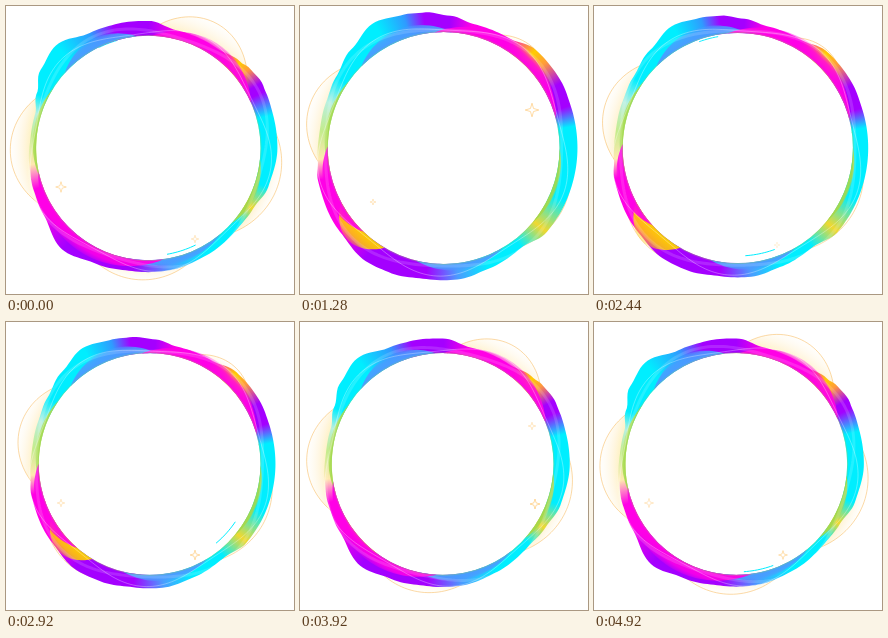
These frames come from a looping animation (288 by 288 pixels, 5120 ms). An HTML page with a canvas:

```html
<!DOCTYPE html>
<html lang="en">
<head>
<meta charset="utf-8">
<title>Iridescent ring</title>
<style>
html, body { margin: 0; width: 100%; height: 100%; overflow: hidden; background: #fff; }
canvas { display: block; width: 288px; height: 288px; }
</style>
</head>
<body>
<canvas id="stage" width="288" height="288"></canvas>
<script>
const ctx = document.getElementById('stage').getContext('2d');
const R = 113, CX = 142.3, CY = 142, LOOP = 5120, STEPS = 60;
const TAU = Math.PI * 2, RAD = Math.PI / 180;
const CYAN = '#00eeff', BLUE = '#4a9cff', PURPLE = '#a400ff', PINK = '#ff00e6', GOLD = '#ffcc00';

// Outer band: colour, then angle and thickness in the first pose and in the second
const BAND = [
  [CYAN, 0, 17, 0, 15], [CYAN, 18, 14, 24, 15], ['#f0d830', 30, 9, 40, 15],
  [CYAN, 40, 8, 53, 9], [CYAN, 62, 10, 70, 11], [BLUE, 80, 12, 84, 14],
  [PURPLE, 97, 12, 98, 14], [PURPLE, 115, 15, 113, 17], [PURPLE, 130, 21, 125, 18],
  [PINK, 148, 12, 140, 15], [PINK, 160, 10, 166, 12], ['#ffe9b0', 172, 8, 175, 9],
  ['#c4ec8c', 186, 6, 188, 8], ['#b8f0e0', 197, 6, 202, 9], [CYAN, 206, 12, 214, 11],
  [CYAN, 216, 21, 228, 16], [CYAN, 228, 26, 242, 23], ['#2f9bff', 243, 17, 254, 20],
  [PURPLE, 254, 16, 262, 18], [PURPLE, 270, 15, 273, 14], [PINK, 283, 9, 283, 10],
  [PINK, 305, 9, 300, 10], [GOLD, 317, 14, 313, 16], ['#ff9a3c', 322, 17, 320, 16],
  [PURPLE, 330, 19, 331, 16], [PURPLE, 334, 18, 342, 15], [CYAN, 345, 17, 351, 15]
];

// Crescents along the inner edge: colour, then start, end and height in both poses
const CRESCENTS = [
  [BLUE, 222, 264, 10, 225, 275, 11],
  [BLUE, 50, 102, 7, 60, 104, 7],
  ['#a8d848', 6, 42, 5, 0, 40, 4],
  ['#a8dc50', 164, 212, 4, 168, 215, 4],
  [GOLD, 128, 152, 0, 120, 152, 18],
  [PINK, 272, 336, 13, 265, 346, 12],
  [PINK, 82, 168, 12, 138, 182, 10]
];

// Pale outlined lobes: start, end and height in both poses
const LOBES = [
  [268, 330, 30, 290, 335, 17],
  [335, 412, 23, 352, 425, 17],
  [60, 130, 20, 100, 165, 18],
  [145, 212, 26, 168, 230, 24]
];

// Sparkles: x, y, size, step of full brightness
const SPARKS = [
  [55, 181, 6, 2], [55, 181, 5, 38], [189, 233, 5, 57], [189, 233, 5, 34],
  [105, 52, 5, 7], [38, 156, 5, 8], [232, 104, 7, 14], [73, 196, 4, 18],
  [79, 216, 5, 24], [183, 239, 5, 25], [235, 182, 5, 47], [232, 104, 5, 50]
];

const POSE = [[0, 0], [7, .65], [15, .92], [23, 1], [30, 1], [35, .87], [47, .2], [59, 0], [60, 0]];
const SWELL = [[0, 1], [7, 1.1], [15, 1.15], [23, 1], [60, 1]];

const mix = (a, b, u) => a + (b - a) * u;
const blend = (row, at, p) => mix(row[at], row[at + (row.length === 5 ? 2 : 3)], p);

function track(keys, x) {
  const n = keys.findIndex(k => k[0] > x);
  const [a, b] = [keys[n - 1], keys[n]];
  return mix(a[1], b[1], (x - a[0]) / (b[0] - a[0]));
}

function polar(r, from, to) {
  const n = Math.max(2, Math.ceil(Math.abs(to - from) / 1.5));
  for (let j = 0; j <= n; j++) {
    const a = mix(from, to, j / n), d = r(a, j / n);
    ctx.lineTo(d * Math.cos(a * RAD), d * Math.sin(a * RAD));
  }
}

function line(r, from, to, color, width) {
  ctx.beginPath();
  polar(r, from, to);
  ctx.strokeStyle = color;
  ctx.lineWidth = width;
  ctx.stroke();
}

function arch(from, to, height, fill) {
  const r = (a, u) => R + height * Math.max(0, Math.sin(Math.PI * u)) ** .9;
  ctx.beginPath();
  polar(r, from, to);
  polar(() => R, to, from);
  ctx.closePath();
  ctx.fillStyle = fill;
  ctx.fill();
  return r;
}

function drawLobes(p) {
  for (const row of LOBES) {
    const [from, to, h] = [0, 1, 2].map(n => blend(row, n, p));
    const g = ctx.createRadialGradient(0, 0, R, 0, 0, R + h);
    g.addColorStop(0, 'rgba(250,220,80,.5)');
    g.addColorStop(.5, 'rgba(255,230,170,.35)');
    g.addColorStop(1, 'rgba(255,250,240,.15)');
    line(arch(from, to, h, g), from, to, '#f9bf68', .6);
  }
}

function drawBand(p, swell) {
  const pts = BAND.map(row => [blend(row, 1, p), blend(row, 2, p) * swell]);
  pts.push([360, pts[0][1]]);
  const edge = a => {
    let n = 1;
    while (n < pts.length - 1 && pts[n][0] < a) n++;
    const [a0, h0] = pts[n - 1], [a1, h1] = pts[n];
    return R + mix(h0, h1, (1 - Math.cos(Math.PI * (a - a0) / (a1 - a0))) / 2);
  };
  const g = ctx.createConicGradient(0, 0, 0);
  BAND.forEach((row, n) => g.addColorStop(pts[n][0] / 360, row[0]));
  g.addColorStop(1, CYAN);
  ctx.beginPath();
  polar(edge, 0, 360);
  ctx.closePath();
  ctx.moveTo(R, 0);
  ctx.arc(0, 0, R, 0, TAU);
  ctx.fillStyle = g;
  ctx.fill('evenodd');
}

function drawCrescents(p) {
  for (const row of CRESCENTS) {
    const [from, to, h] = [1, 2, 3].map(n => blend(row, n, p));
    if (h < .3) continue;
    const g = ctx.createRadialGradient(0, 0, R, 0, 0, R + h);
    g.addColorStop(0, row[0]);
    g.addColorStop(.6, row[0] + 'd8');
    g.addColorStop(1, row[0] + '40');
    arch(from, to, h, g);
  }
}

function drawStrands(p) {
  const wave = (n, shift) => a => R + 7 + 5 * Math.sin((n * a + shift) * RAD);
  line(wave(5, 40 - 60 * p), 0, 360, 'rgba(255,255,255,.4)', .8);
  line(wave(4, 200 + 70 * p), 0, 360, 'rgba(255,255,255,.14)', 3);
  line(() => R + .4, 0, 360, 'rgba(150,210,90,.4)', .8);
}

// Two opposite streaks circle once per loop and show only on part of the way
function drawStreaks(i) {
  const a = (((71 - 6 * i) % 180) + 180) % 180;
  if (a > 34 && a < 130) line(() => 108 - .004 * (a - 75) ** 2, a - 7, a + 9, CYAN, 1);
  if (a > 65 && a < 120) {
    const r = 112 + Math.max(0, a - 75) * .55;
    line(() => r, a + 173, a + 183, CYAN, .9);
  }
}

function drawSparks(i) {
  ctx.strokeStyle = '#ffc060';
  ctx.lineWidth = .7;
  for (const [x, y, size, peak] of SPARKS) {
    const d = Math.abs(i - peak), gap = Math.min(d, STEPS - d);
    if (gap >= 5) continue;
    const glow = Math.cos(gap / 10 * Math.PI);
    ctx.globalAlpha = glow * .85;
    ctx.beginPath();
    for (let n = 0; n < 8; n++) {
      const r = size * (.4 + .6 * glow) * (n % 2 ? .32 : 1), a = n * Math.PI / 4;
      ctx.lineTo(x + r * Math.cos(a), y + r * Math.sin(a));
    }
    ctx.closePath();
    ctx.stroke();
  }
  ctx.globalAlpha = 1;
}

// Twelve steps a second: one of 120 ms, then eleven of 80 ms
function stepAt(t) {
  const u = t % 1000;
  const n = u < 120 ? 0 : 1 + Math.floor((u - 120) / 80);
  return Math.min(STEPS - 1, Math.floor(t / 1000) * 12 + n);
}

function draw(i) {
  const p = track(POSE, i), swell = track(SWELL, i);
  const scale = 1 + 3 / R * Math.cos(TAU * (i - 3.5) / 12);
  ctx.setTransform(1, 0, 0, 1, 0, 0);
  ctx.fillStyle = '#fff';
  ctx.fillRect(0, 0, 288, 288);
  ctx.translate(CX + 1.5 * p, CY);
  drawStreaks(i);
  ctx.scale(scale, scale);
  drawLobes(p);
  drawBand(p, swell);
  drawCrescents(p);
  drawStrands(p);
  ctx.setTransform(1, 0, 0, 1, 0, 0);
  drawSparks(i);
}

const start = performance.now();
function tick() {
  draw(stepAt((performance.now() - start) % LOOP));
  requestAnimationFrame(tick);
}
tick();
</script>
</body>
</html>
```
